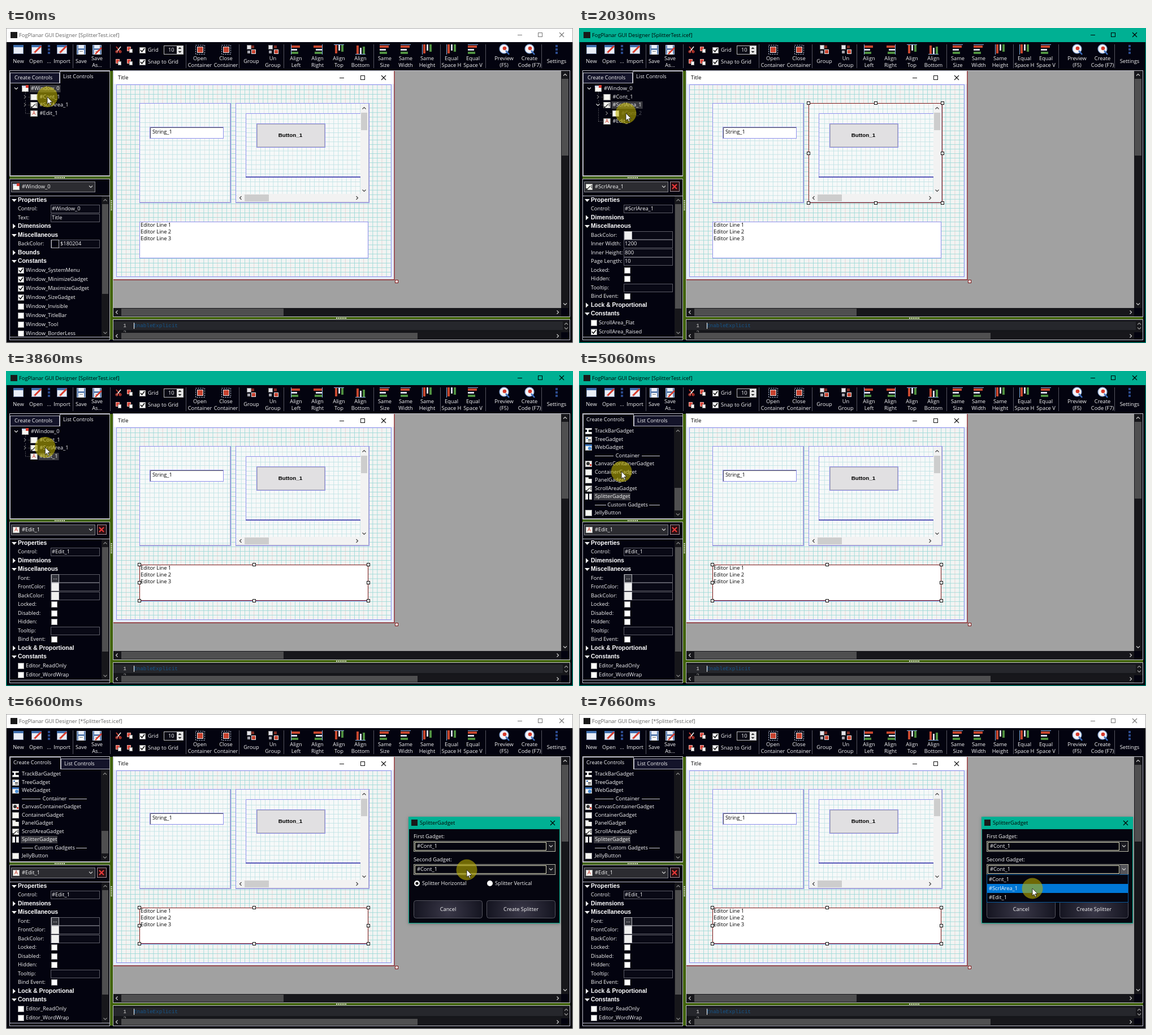
An HTML page with a canvas that plays this animation: 1003x558 px, repeating every 8 s.

```html
<!DOCTYPE html>
<html lang="en">
<head>
<meta charset="utf-8">
<title>GUI Designer</title>
<style>
html, body { margin: 0; width: 100%; height: 100%; overflow: hidden; background: #03030f; }
canvas { display: block; }
</style>
</head>
<body>
<canvas id="stage" width="1003" height="558"></canvas>
<script>
const c = document.getElementById('stage').getContext('2d');
const LOOP = 8000;
const UI = '500 9.3px "Open Sans", "Noto Sans", sans-serif';
const BOLD = 'bold 10.4px "Liberation Sans", Arial, sans-serif';
const CAPTION = 'bold 9.8px "Liberation Sans", Arial, sans-serif';
const MONO = '9.3px "Liberation Mono", monospace';
const NAVY = '#03030f', TEAL = '#00b093', VIOLET = '#8f8fec', RED = '#7d1616', LIGHT = '#f6f6f6';
const PITCH = 8.08;

// ---------- drawing helpers ----------
function box(x, y, w, h, fill, stroke) {
  if (fill) { c.fillStyle = fill; c.fillRect(x, y, w, h); }
  if (stroke) { c.lineWidth = 1; c.strokeStyle = stroke; c.strokeRect(x + .5, y + .5, w - 1, h - 1); }
}
function text(s, x, y, color = LIGHT, align = 'left', font = UI) {
  c.font = font; c.fillStyle = color; c.textAlign = align;
  c.fillText(s, x, y + 3.4);
}
function line(color, width, ...p) {
  c.strokeStyle = color; c.lineWidth = width;
  c.beginPath();
  for (let i = 0; i < p.length; i += 2) c.lineTo(p[i], p[i + 1]);
  c.stroke();
}
function shape(color, ...p) {
  c.fillStyle = color;
  c.beginPath();
  for (let i = 0; i < p.length; i += 2) c.lineTo(p[i], p[i + 1]);
  c.closePath(); c.fill();
}
function disc(x, y, r, fill, stroke) {
  c.beginPath(); c.arc(x, y, r, 0, 7);
  if (fill) { c.fillStyle = fill; c.fill(); }
  if (stroke) { c.strokeStyle = stroke; c.lineWidth = 1.3; c.stroke(); }
}
function chevron(x, y, dir, color = '#aaa', r = 3) {
  c.save(); c.translate(x, y); c.rotate({ right: 0, down: 1, left: 2, up: 3 }[dir] * Math.PI / 2);
  line(color, 1.2, -r / 2, -r, r / 2, 0, -r / 2, r);
  c.restore();
}
function check(x, y, on) {
  box(x - 5, y - 5, 11, 11, '#fff', '#999');
  if (on) line('#111', 1.6, x - 3, y, x - .5, y + 3, x + 4, y - 3);
}
function vbar(x, y, w, h, top, len, bg, thumb, ink) {
  box(x, y, w, h, bg);
  box(x + 1, top, w - 2, len, thumb);
  chevron(x + w / 2, y + 7, 'up', ink); chevron(x + w / 2, y + h - 7, 'down', ink);
}
function hbar(x, y, w, h, left, len, bg, thumb, ink) {
  box(x, y, w, h, bg);
  box(left, y + 1, len, h - 2, thumb);
  chevron(x + 6, y + h / 2, 'left', ink); chevron(x + w - 6, y + h / 2, 'right', ink);
}
function dots(x, y, dx, dy) {
  for (let i = 0; i < 6; i++) box(x + i * dx, y + i * dy, 2, 2, '#e8e8e8');
}
function winButtons(xs, y, color, r = 4) {
  const [a, b, d] = xs;
  if (a) line(color, 1, a - r, y + .5, a + r, y + .5);
  if (b) box(b - r, y - r, 2 * r, 2 * r, null, color);
  line(color, 1.1, d - r, y - r, d + r, y + r);
  line(color, 1.1, d + r, y - r, d - r, y + r);
}

// ---------- toolbar ----------
function page(x, pen) {
  box(x - 9, 30, 18, 16, '#e9edf6', '#8090b0');
  box(x - 9, 30, 18, 4, '#3f6fae');
  if (pen) { line('#d83a2b', 3, x - 4, 44, x + 8, 32); line('#fff', 1, x - 5, 45, x - 3, 43); }
}
function floppy(x, pen) {
  box(x - 8, 30, 16, 17, '#5d7fb0', '#a9bddb');
  box(x - 5, 30, 10, 6, '#e8eef8'); box(x - 5, 39, 10, 8, '#fff');
  box(x - 3, 41, 6, 1, '#777');
  if (pen) line('#d83a2b', 2.5, x - 3, 46, x + 8, 35);
}
function container(x) {
  c.setLineDash([2, 2]); box(x - 8, 30, 17, 17, null, '#cfdcf4'); c.setLineDash([]);
  box(x - 5, 33, 11, 11, '#e4e4ea'); box(x - 4, 34, 9, 9, '#c8432f');
}
function group(x, gap) {
  box(x - 8, 30, 8, 8, '#e4e4ea', '#888');
  box(x + gap, 38, 8, 8, '#c8432f', '#e4e4ea');
  box(x + gap, 31, 5, 5, '#7a2a22'); box(x - 7, 40, 5, 5, '#a4a4ac');
}
function bars(x, upright, shift, mark) {
  const put = (a, b, w, h, f) => upright ? box(x - 9 + b, 29 + a, h, w, f) : box(x - 9 + a, 29 + b, w, h, f);
  put(shift, 2, 16, 4, '#c8482f');
  put(shift ? 6 : 0, 8, 11, 3, '#d8dce8');
  put(shift ? 4 : 0, 13, 13, 4, '#4f9040');
  if (mark >= 0) put(mark, 0, 1, 18, '#8fb4e8'); else put(0, 0, 18, 1, '#8fb4e8');
}
function lens(x) {
  disc(x, 37, 8, '#f4f4f8', '#7f9fd0');
  disc(x + 1, 36, 3.3, '#d63a2c');
  line('#3d6fc0', 2.5, x + 3, 40, x + 9, 47);
}
function toolbar() {
  [[22, 'New'], [53, 'Open'], [76, '...'], [99, 'Import'], [133, 'Save'], [161, 'Save', 'As...'],
   [343, 'Open', 'Container'], [389, 'Close', 'Container'], [434, 'Group'], [472, 'Un', 'Group'],
   [513, 'Align', 'Left'], [551, 'Align', 'Right'], [589, 'Align', 'Top'], [627, 'Align', 'Bottom'],
   [670, 'Same', 'Size'], [707, 'Same', 'Width'], [745, 'Same', 'Height'],
   [788, 'Equal', 'Space H'], [826, 'Equal', 'Space V'],
   [881, 'Preview', '(F5)'], [926, 'Create', 'Code (F7)'], [974, 'Settings']
  ].forEach(([x, a, b]) => {
    text(a, x, b ? 54 : 59, LIGHT, 'center');
    if (b) text(b, x, 66, LIGHT, 'center');
  });
  [118, 184, 318, 412, 491, 650, 768, 848, 947].forEach(x => box(x, 29, 1, 42, '#55555f'));
  page(22); page(54, true); page(99, true);
  [76, 974].forEach(x => { for (let i = 0; i < 3; i++) box(x - 2, 30 + i * 6, 4, 4, '#2b4a8c'); });
  floppy(133); floppy(161, true);
  line('#e04434', 1.6, 195, 33, 202, 42); line('#f4f4f4', 1.6, 203, 33, 196, 42);
  disc(196, 42, 1.8, null, '#e04434'); disc(202, 42, 1.8, null, '#e04434');
  for (const [x, y] of [[219, 38], [199, 60], [219, 60]]) {
    box(x - 5, y - 5, 7, 8, '#d8453a', '#f0b0a8'); box(x - 1, y - 1, 6, 7, '#fff', '#999');
  }
  check(241, 39, true); text('Grid', 251, 39);
  check(241, 60, true); text('Snap to Grid', 251, 60);
  box(279, 31, 35, 16, '#0a0a14', '#bbb'); text('10', 287, 39);
  box(302, 32, 11, 14, '#e4e4e4');
  shape('#222', 304.5, 37, 310.5, 37, 307.5, 34); shape('#222', 304.5, 41, 310.5, 41, 307.5, 44);
  container(343); container(389); group(434, 0); group(472, 2);
  bars(513, false, 0, 0); bars(551, false, 2, 17); bars(589, true, 0, 0); bars(627, true, 2, 17);
  bars(670, false, 0, -1); bars(707, false, 0, -1); bars(745, true, 0, -1);
  bars(788, true, 0, -1); bars(826, false, 0, -1);
  lens(881); lens(926);
}

// ---------- main window ----------
function frame(active, changed) {
  box(0, 0, 1003, 558, NAVY);
  box(0, 0, 1003, 25, active ? TEAL : '#fff');
  const ink = active ? '#000' : '#777';
  box(8, 7, 12, 11, '#1a1a1a');
  text(`FogPlanar GUI Designer [${changed ? '*' : ''}SplitterTest.icef]`, 23, 13, active ? '#000' : '#666');
  winButtons([909, 945, 983], 12, ink);
  box(0, 0, 1003, 558, null, active ? TEAL : '#a8a8a8');
}
function grid(x, y, w, h, inset, bg, ink, warm) {
  box(x, y, w, h, bg);
  for (let i = 1; i * PITCH + inset < w; i++) box(x + inset + i * PITCH, y, .85, h, i % 4 == 2 ? warm : ink);
  for (let i = 1; i * PITCH + inset < h; i++) box(x, y + inset + i * PITCH, w, .85, ink);
}
function innerGrid(x, y, w, h) {
  grid(x, y, w, h, 1.8, '#f6f9f9', '#bfe2e4', '#dbe2e4');
}
function raised(x, y, w, h) {
  innerGrid(x, y, w, h);
  box(x, y, w, h, null, VIOLET);
  line('#b2b2c8', 1, x + 1, y + h - 1.5, x + w - 1.5, y + h - 1.5, x + w - 1.5, y + 1);
}
function form() {
  box(190, 76, 792, 420, '#a1a1a1');
  box(190, 76, 498, 371, '#e6ecfa');
  box(191, 77, 496, 22, '#fff');
  text('Title', 198, 88, '#000');
  winButtons([594, 631, 668], 88, '#111');
  grid(195, 100, 487, 341, .9, '#f2f4f3', '#9bd8d6', '#e2d0d0');
  box(195, 100, 487, 341, null, VIOLET);
  line(RED, 1.4, 687, 76, 687, 446, 190, 446);
  box(688, 446, 6, 6, '#fff', RED);

  raised(236, 133, 162, 177);
  box(254, 175, 131, 21, '#fff', VIOLET);
  line('#555', 1, 255.5, 195, 255.5, 176.5, 384, 176.5);
  text('String_1', 259, 184, '#000');

  raised(406, 133, 237, 177);
  innerGrid(424, 151, 203, 114);
  line(VIOLET, 1, 627, 151.5, 424.5, 151.5, 424.5, 264);
  line('#5656b8', 2, 424, 264, 627, 264);
  box(443, 169, 122, 43, '#e1e0e2', VIOLET);
  box(444, 170, 120, 41, null, '#b0b0b4');
  text('Button_1', 503, 190, '#000', 'center', CAPTION);
  box(627, 135, 14, 173, '#f2f2f2');
  vbar(627, 135, 13, 160, 150, 31, '#f2f2f2', '#cdcdcd', '#444');
  hbar(409, 294, 218, 14, 422, 43, '#f2f2f2', '#cdcdcd', '#444');

  box(236, 343, 405, 65, '#fff', VIOLET);
  for (let i = 0; i < 3; i++) text('Editor Line ' + (i + 1), 238, 349 + i * 12, '#000');

  vbar(982, 76, 14, 420, 90, 136, '#17171b', '#4f4f50', '#ccc');
  hbar(190, 496, 792, 15, 204, 287, '#17171b', '#4f4f50', '#ccc');
}
function splitters() {
  const green = '#41630a', edge = '#c0c0c8';
  box(6, 263, 178, 4, green);
  box(184, 76, 5, 476, green);
  box(189, 512, 809, 4, green);
  box(6, 75, 178, 188, null, edge); box(6, 267, 178, 286, null, edge);
  box(189, 75, 809, 437, null, edge); box(189, 516, 809, 37, null, edge);
  dots(86, 264, 3.2, 0); dots(185.5, 305, 0, 3.2); dots(584, 513, 3.2, 0);
}
function code() {
  box(190, 517, 795, 22, '#15161a');
  box(190, 520, 795, 15, '#26272c');
  text('1', 210, 527, '#d0d0d0', 'center', MONO);
  c.save(); c.beginPath(); c.rect(190, 535, 795, 4); c.clip();
  text('2', 210, 539, '#999', 'center', MONO);
  c.restore();
  text('EnableExplicit', 226, 527, '#15568c', 'left', MONO);
  box(226, 522, 1, 11, '#fff');
  vbar(985, 517, 12, 22, 0, 0, '#17171b', '#17171b', '#999');
  hbar(190, 539, 792, 13, 204, 524, '#17171b', '#4f4f50', '#ccc');
}

// ---------- left side ----------
function icon(kind, x, y) {
  box(x - 6, y - 5, 12, 11, '#f7f7f2', '#aaa');
  if (kind == 'window') { box(x - 6, y - 5, 12, 3, '#c9d4e8'); box(x + 1, y - 6, 5, 5, '#d8382c'); }
  if (kind == 'scroll') { line('#333', 1.2, x - 3, y + 4, x + 2, y - 1); box(x + 3, y - 3, 2, 6, '#888'); box(x - 6, y + 3, 3, 3, '#333'); }
  if (kind == 'edit') text('A', x, y, '#c0281c', 'center');
  if (kind == 'string') text('abl', x, y, '#222', 'center');
  if (kind == 'split') box(x - 1, y - 5, 2, 11, NAVY);
  if (kind == 'web') { box(x - 6, y - 5, 12, 3, '#3f78c0'); disc(x + 2, y + 2, 3, '#4b90d8'); }
  if (kind == 'tree') { box(x - 4, y - 3, 3, 2, '#3f78c0'); box(x - 1, y, 5, 2, '#555'); box(x - 1, y + 3, 5, 1, '#555'); }
  if (kind == 'track') { box(x - 6, y - 2, 12, 4, NAVY); box(x - 3, y - 4, 3, 8, '#fff'); }
  if (kind == 'canvas') { disc(x - 1, y, 3, '#333'); box(x + 2, y + 1, 3, 3, '#d8382c'); }
  if (kind == 'panel') box(x, y - 5, 6, 3, NAVY);
}
function tabs(create) {
  box(7, 97, 177, 165, NAVY, '#b4b4be');
  const [on, off] = create ? [[7, 90], [97, 87]] : [[95, 89], [7, 88]];
  box(off[0], 79, off[1], 19, '#14142a', '#b4b4be');
  box(on[0], 76, on[1], 22, NAVY);
  line('#c8c8d0', 1, on[0] + .5, 98, on[0] + .5, 76.5, on[0] + on[1] - .5, 76.5, on[0] + on[1] - .5, 98);
  text('Create Controls', create ? 13 : 15, create ? 86 : 88);
  text('List Controls', create ? 103 : 101, create ? 88 : 86);
}
function treeRow(kind, name, depth, y, arrow, lit) {
  const x = 34 + depth * 15.5, tx = x + 10;
  if (lit) { c.font = UI; box(tx - 2, y - 6, c.measureText(name).width + 4, 13, '#3a3a40'); }
  if (depth) { c.setLineDash([1, 2]); line('#888', 1, x - 15, y + .5, x - 6, y + .5); c.setLineDash([]); }
  if (arrow) {
    box(x - 20, y - 4, 9, 9, NAVY);
    chevron(x - 16, y, arrow, arrow == 'down' ? '#ddd' : '#777');
  }
  icon(kind, x, y);
  text(name, tx + (kind == 'string' ? 4 : 0), y, depth > 1 ? '#55555e' : LIGHT);
}
function tree(open, lit) {
  const rows = [['window', '#Window_0', 0, 'down'], ['cont', '#Cont_1', 1, open == 1 ? 'down' : 'right']];
  if (open == 1) rows.push(['string', '#String_1', 2]);
  rows.push(['scroll', '#ScrlArea_1', 1, open == 2 ? 'down' : 'right']);
  if (open == 2) rows.push(['cont', '#Cont_2', 2, 'right']);
  rows.push(['edit', '#Edit_1', 1]);
  c.setLineDash([1, 2]); line('#888', 1, 34.5, 113, 34.5, 107 + (rows.length - 1) * 14.5); c.setLineDash([]);
  rows.forEach(([kind, name, depth, arrow], i) =>
    treeRow(kind, name, depth, Math.round(107 + i * 14.5), arrow, lit.includes(name)));
}
function gadgets() {
  [['track', 'TrackBarGadget'], ['tree', 'TreeGadget'], ['web', 'WebGadget'], [0, 'Container', 24],
   ['canvas', 'CanvasContainerGadget'], ['cont', 'ContainerGadget'], ['panel', 'PanelGadget'],
   ['scroll', 'ScrollAreaGadget'], ['split', 'SplitterGadget'], [0, 'Custom Gadgets', 37], ['cont', 'JellyButton']
  ].forEach(([kind, name, half], i) => {
    const y = Math.round(106 + i * 14.53);
    if (!kind) {
      line('#ccc', 1, 28, y + .5, 85 - half, y + .5); line('#ccc', 1, 87 + half, y + .5, 143, y + .5);
      return text(name, 86, y, LIGHT, 'center');
    }
    if (kind == 'split') box(26, y - 6, 65, 13, '#3a3a40');
    icon(kind, 17, y);
    text(name, 28, y);
  });
  vbar(168, 99, 14, 162, 207, 40, '#17171b', '#4f4f50', '#888');
}

// Row marks: v/> heading, = field, # swatch, ? checkbox, +/- constant
const named = (prefix, list) => list.split(' ').map(s => s[0] + prefix + s.slice(1));
const head = name => ['vProperties', '=Control:|' + name];
const misc = ['>Dimensions', 'vMiscellaneous'];
const tail = ['>Lock & Proportional', 'vConstants'];
const panels = [
  { kind: 'window', name: '#Window_0', thumb: 159, rows: [...head('#Window_0'), '=Text:|Title', ...misc,
    '#BackColor:|$180204|#03030f', '>Bounds', 'vConstants',
    ...named('Window_', '+SystemMenu +MinimizeGadget +MaximizeGadget +SizeGadget -Invisible -TitleBar -Tool -BorderLess')] },
  { kind: 'cont', name: '#Cont_1', area: [237, 133, 398, 310], rows: [...head('#Cont_1'), ...misc,
    '#BackColor:||#f0f0f0', '?Locked:', '?Hidden:', '=Tooltip:|', ...tail,
    ...named('Container_', '-BorderLess -Flat +Raised -Single -Double')] },
  { kind: 'scroll', name: '#ScrlArea_1', area: [406, 133, 643, 310], thumb: 185, rows: [...head('#ScrlArea_1'), ...misc,
    '#BackColor:||#f0f0f0', '=Inner Width:|1200', '=Inner Height:|800', '=Page Length:|10',
    '?Locked:', '?Hidden:', '=Tooltip:|', '?Bind Event:', ...tail, ...named('ScrollArea_', '-Flat +Raised')] },
  { kind: 'edit', name: '#Edit_1', area: [236, 343, 641, 407], thumb: 185, rows: [...head('#Edit_1'), ...misc,
    '#Font:||#33343c|...', '#FrontColor:||#f0f0f0', '#BackColor:||#f0f0f0', '?Locked:', '?Disabled:', '?Hidden:',
    '=Tooltip:|', '?Bind Event:', ...tail, ...named('Editor_', '-ReadOnly -WordWrap')] }
];
function properties({ kind, name, thumb, rows, area }) {
  box(6, 268, 178, 284, NAVY);
  box(9, 272, 149, 19, '#2c2c31', '#85858c');
  icon(kind, 18, 281); text(name, 28, 281); chevron(150, 281, 'down', '#ccc');
  if (area) {
    box(161, 272, 17, 18, '#2a1014', '#a09098');
    line('#f03838', 2.2, 165, 277, 173, 285); line('#f03838', 2.2, 173, 277, 165, 285);
  }
  box(6, 297, 178, 251, null, '#c0c0c8');
  c.save(); c.beginPath(); c.rect(7, 298, 176, 248); c.clip();
  const right = thumb ? 166 : 180;
  let y = 305;
  for (const row of rows) {
    const mark = row[0], [label, value, fill, cap] = row.slice(1).split('|'), py = Math.round(y);
    if ('v>'.includes(mark)) {
      if (mark == 'v') shape(LIGHT, 10, py - 2, 19, py - 2, 14.5, py + 3);
      else shape(LIGHT, 12, py - 4.5, 12, py + 4.5, 17, py);
      text(label, 21, py, '#fff', 'left', BOLD);
    } else if ('+-'.includes(mark)) {
      check(26, py, mark == '+'); text(label, 35, py);
    } else {
      text(label, 21, py);
      if (mark == '?') check(85, py);
      else {
        box(79, py - 7, right - 79, 15, '#090915', '#5c5c66');
        if (fill) { box(80, py - 7, 14, 15, fill, '#b8b8be'); if (cap) text(cap, 87, py - 1, '#fff', 'center'); }
        text(value, fill ? 96 : 81, py);
      }
    }
    y += '+-'.includes(mark) ? 16 : 15.47;
  }
  c.restore();
  if (thumb) vbar(169, 298, 13, 249, 312, thumb, '#17171b', '#4f4f50', '#888');
}
function handles([x1, y1, x2, y2]) {
  box(x1, y1, x2 - x1, y2 - y1, null, RED);
  const xs = [x1, (x1 + x2) / 2, x2], ys = [y1, (y1 + y2) / 2, y2];
  xs.forEach((x, i) => ys.forEach((y, j) => {
    if (i != 1 || j != 1) box(Math.round(x) - 3, Math.round(y) - 3, 6, 6, '#fff', '#111');
  }));
}

// ---------- dialog ----------
function combo(label, y, pressed) {
  text(label, 721, y - 17);
  box(721, y - 9, 251, 19, '#05050f', '#b9b9a8');
  box(723, y - 7, 233, 15, '#05050f', '#e8e8c8');
  box(957, y - 8, 14, 17, pressed ? '#55555a' : '#1a1a20');
  chevron(964, y, 'down', '#ccc');
  text('#Cont_1', 727, y);
}
function button(label, x) {
  const g = c.createRadialGradient(x + 61, 350, 0, x + 61, 350, 62);
  g.addColorStop(0, '#3a3848'); g.addColorStop(1, '#141420');
  c.beginPath(); c.roundRect(x + .5, 330.5, 121, 31, 4);
  c.fillStyle = g; c.fill(); c.strokeStyle = '#55555f'; c.lineWidth = 1; c.stroke();
  text(label, x + 61, 346, LIGHT, 'center');
}
function radio(label, x, on) {
  disc(x, 300, 5, '#fff');
  if (on) disc(x, 300, 2.6, '#111');
  text(label, x + 9, 300);
}
function dialog(drop, hot) {
  c.save(); c.shadowColor = 'rgba(0,0,0,.3)'; c.shadowBlur = 5; c.shadowOffsetY = 1;
  box(712, 182, 268, 189, TEAL);
  c.restore();
  box(713, 204, 266, 166, '#05050f');
  box(717, 187, 11, 11, '#1a1a1a');
  text('SplitterGadget', 732, 193, '#000');
  winButtons([0, 0, 967], 193, '#000');
  combo('First Gadget:', 234);
  combo('Second Gadget:', 275, drop > 0);
  radio('Splitter Horizontal', 727, true);
  radio('Splitter Vertical', 856);
  button('Cancel', 721); button('Create Splitter', 850);
  if (!drop) return;
  c.save();
  c.beginPath(); c.rect(721, 284, 251, 50 * drop); c.clip();
  c.translate(0, 50 * (drop - 1));
  box(721, 284, 251, 50, '#05050f', '#0a5a9c');
  box(722, 285 + hot * 16, 249, 16, '#0078d7');
  ['#Cont_1', '#ScrlArea_1', '#Edit_1'].forEach((s, i) => text(s, 725, 293 + i * 16));
  c.restore();
}

// ---------- pointer ----------
// start, end, steps, x, y
const moves = [
  [1200, 1660, 15, 83, 151], [2300, 3000, 22, 80, 165], [3630, 4130, 16, 52, 87],
  [4760, 5230, 15, 86, 221], [6100, 6600, 16, 815, 276], [7200, 7660, 15, 802, 309]
];
const ease = p => p < .5 ? 2 * p * p : 1 - 2 * (1 - p) ** 2;
function stepped(t, start, end, n) {
  if (t < start) return 0;
  return Math.min(n, Math.floor((t - start) * (n - 1) / (end - start) + 1e-6) + 1) / n;
}
function pointerAt(t) {
  let x = 73, y = 122;
  for (const [start, end, n, tx, ty] of moves) {
    const p = ease(stepped(t, start, end, n));
    x += (tx - x) * p; y += (ty - y) * p;
  }
  return [x, y];
}
function pointer(x, y) {
  disc(x, y, 18.5, 'rgba(190,178,0,.58)');
  c.save(); c.translate(x, y);
  c.beginPath();
  c.moveTo(0, 0); c.lineTo(0, 13); c.lineTo(3, 10.3); c.lineTo(5, 15);
  c.lineTo(7, 14.2); c.lineTo(5, 9.6); c.lineTo(9, 9.3); c.closePath();
  c.fillStyle = '#fff'; c.fill(); c.strokeStyle = '#111'; c.lineWidth = .8; c.stroke();
  c.restore();
}

// ---------- timeline ----------
function draw(t) {
  const asking = t >= 5600;
  const picked = t < 960 ? 0 : t < 1900 ? 1 : t < 3400 ? 2 : 3;
  const open = t < 1000 ? 0 : t < 2030 ? 1 : t < 3430 ? 2 : 0;
  const lit = [panels[picked].name];
  if (t >= 3260) lit.push('#Edit_1');
  const [x, y] = pointerAt(t);

  frame(t >= 800 && !asking, asking);
  toolbar();
  form();
  code();
  tabs(t >= 4400);
  if (t < 4400) tree(open, lit); else gadgets();
  properties(panels[picked]);
  splitters();
  if (picked) handles(panels[picked].area);
  if (asking) dialog(stepped(t, 6830, 7030, 7), y > 301 ? 1 : 0);
  pointer(x, y);
}
function tick(now) {
  draw(now % LOOP);
  requestAnimationFrame(tick);
}
draw(0);
requestAnimationFrame(tick);
</script>
</body>
</html>
```
